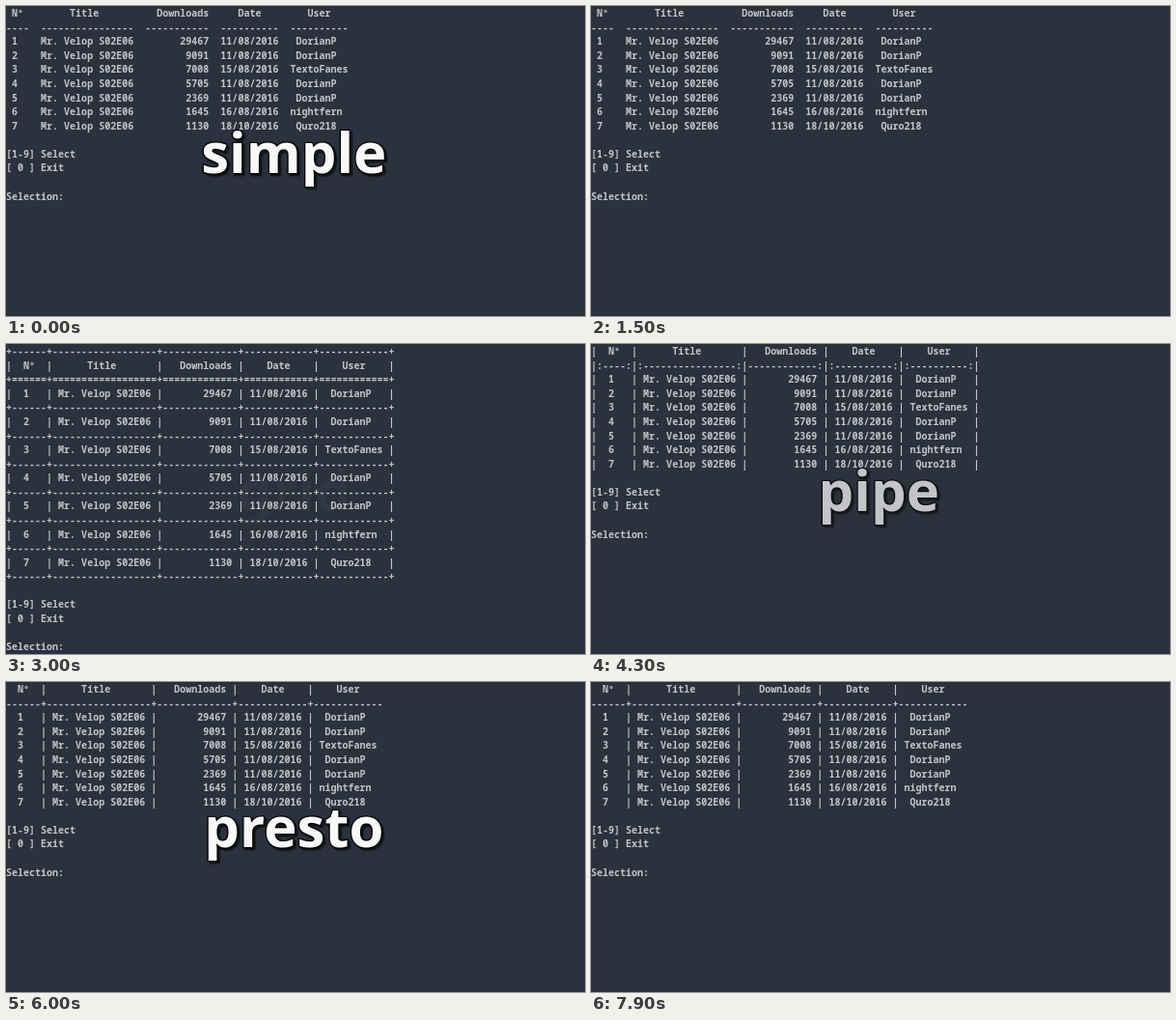
Recreate the animation shown at these times as an HTML page with a canvas. Size 600x321 px, loop 8000 ms.

```html
<!DOCTYPE html>
<html lang="en">
<head>
<meta charset="utf-8">
<title>Table styles</title>
<style>
  html, body { margin: 0; width: 100%; height: 100%; overflow: hidden; background: #2b323d; }
  canvas { display: block; }
</style>
</head>
<body>
<canvas id="stage" width="600" height="321"></canvas>
<script>
const W = 600, H = 321, LOOP = 8000;
const HOLD = 210, FADE = 850;
const LINE = 14.57, BASELINE = 11.1;
const ctx = document.getElementById('stage').getContext('2d');

const widths = [4, 16, 11, 10, 10];
const head = ['N°', 'Title', 'Downloads', 'Date', 'User'];
const rows = [
  [29467, '11/08', 'DorianP'],
  [9091, '11/08', 'DorianP'],
  [7008, '15/08', 'TextoFanes'],
  [5705, '11/08', 'DorianP'],
  [2369, '11/08', 'DorianP'],
  [1645, '16/08', 'nightfern'],
  [1130, '18/10', 'Quro218'],
].map(([count, day, user], i) =>
  [String(i + 1), 'Mr. Velop S02E06', String(count), day + '/2016', user]);
const menu = ['', '[1-9] Select', '[ 0 ] Exit', '', 'Selection:'];

// Downloads are right-aligned, all other columns centred.
function pad(text, col) {
  const w = widths[col];
  if (col === 2) return text.padStart(w);
  return (' '.repeat((w - text.length) >> 1) + text).padEnd(w);
}

const cells = row => row.map(pad);
const piped = row => cells(row).map(c => ` ${c} `).join('|');
const boxed = row => `|${piped(row)}|`;
const rule = ch => widths.map(w => ch.repeat(w + 2)).join('+');

const styles = {
  simple() {
    const join = row => cells(row).join('  ');
    return [join(head), widths.map(w => '-'.repeat(w)).join('  '), ...rows.map(join)];
  },
  grid() {
    const line = ch => `+${rule(ch)}+`;
    return [line('-'), boxed(head), line('='), ...rows.flatMap(r => [boxed(r), line('-')])];
  },
  pipe() {
    const marks = widths.map((w, i) => (i === 2 ? '-' : ':') + '-'.repeat(w) + ':');
    return [boxed(head), `|${marks.join('|')}|`, ...rows.map(boxed)];
  },
  presto() {
    return [piped(head), rule('-'), ...rows.map(piped)];
  },
};

function layer(paint) {
  const canvas = document.createElement('canvas');
  canvas.width = W;
  canvas.height = H;
  paint(canvas.getContext('2d'));
  return canvas;
}

function tableLayer(name) {
  return layer(c => {
    c.fillStyle = '#2b323d';
    c.fillRect(0, 0, W, H);
    c.font = '700 10.02px "Noto Sans Mono", "DejaVu Sans Mono", monospace';
    c.fillStyle = '#c1c5cb';
    [...styles[name](), ...menu].forEach((text, i) =>
      c.fillText(text, 0, BASELINE + i * LINE));
  });
}

function titleLayer(name, y) {
  return layer(c => {
    const x = 298.3;
    c.font = 'bold 58px "Noto Sans", "Open Sans", sans-serif';
    c.textAlign = 'center';
    c.lineJoin = 'round';
    c.lineWidth = 2.6;
    c.strokeStyle = '#000';
    c.shadowColor = 'rgba(0, 0, 0, 0.7)';
    c.shadowOffsetX = c.shadowOffsetY = 2;
    c.shadowBlur = 1.5;
    c.strokeText(name, x, y);
    c.shadowColor = 'transparent';
    c.fillStyle = '#f8f8f8';
    c.fillText(name, x, y);
  });
}

// Style name, start time, title baseline.
const scenes = [
  ['simple', -70, 173],
  ['grid', 1960, 173],
  ['pipe', 3870, 173],
  ['presto', 5810, 171],
].map(([name, start, y]) => ({ start, table: tableLayer(name), title: titleLayer(name, y) }));

function draw(t) {
  const scene = scenes.filter(s => s.start <= t).pop();
  const alpha = 1 - (t - scene.start - HOLD) / FADE;
  ctx.globalAlpha = 1;
  ctx.drawImage(scene.table, 0, 0);
  ctx.globalAlpha = Math.min(1, Math.max(0, alpha));
  ctx.drawImage(scene.title, 0, 0);
}

const begin = performance.now();
function tick() {
  draw((performance.now() - begin) % LOOP);
  requestAnimationFrame(tick);
}
tick();
</script>
</body>
</html>
```
